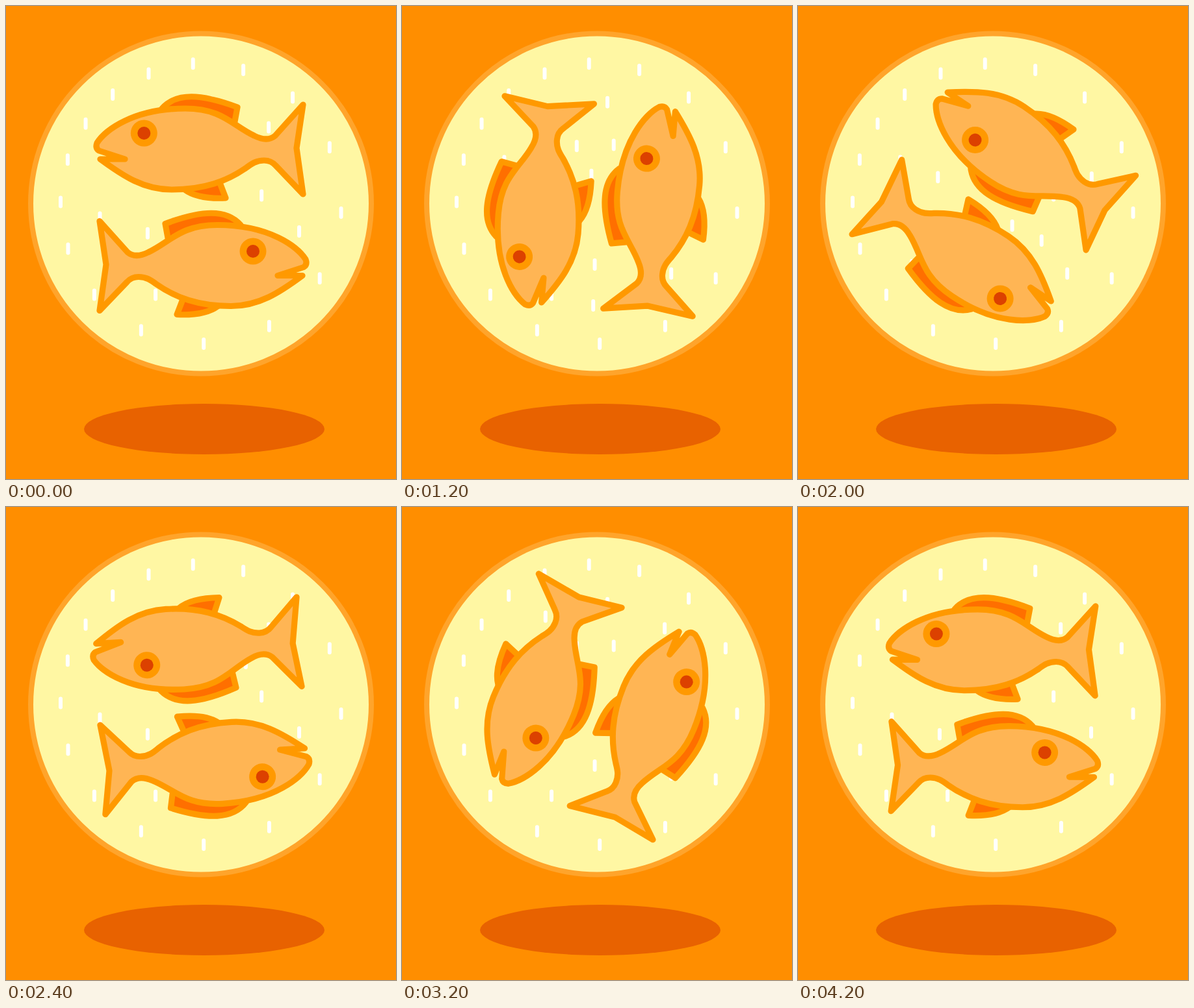
An HTML page for the animation above (4400 ms loop, 600 by 729 pixels).

```html
<!DOCTYPE html>
<html lang="en">
<head>
<meta charset="utf-8">
<title>Fish bowl</title>
<style>
  html, body { margin: 0; width: 100%; height: 100%; overflow: hidden; background: #ff8e00; }
  svg { display: block; }
</style>
</head>
<body>
<svg width="600" height="729" viewBox="0 0 600 729">
  <defs>
    <g id="fish" stroke="#ff9900" stroke-width="9.2" stroke-linejoin="round" stroke-linecap="round">
      <g fill="#ff6f00">
        <path d="M240 158C262 133 300 135 356 156L352 178"/>
        <path d="M275 283Q295 298 338 296L328 270"/>
      </g>
      <path fill="#ffb554" d="M457 152L447 219L457 290L415 246Q408 238 397 238C385 238 378 243 370 249
        C340 270 305 283 255 283C212 283 180 262 145 236L183 236L143 223Q137 219 140 211
        C152 192 195 158 276 158C333 158 348 184 382 200Q402 210 414 200Z"/>
    </g>
    <g id="eye">
      <circle r="20.5" fill="#ff9900"/>
      <circle r="10" fill="#dc4100"/>
    </g>
  </defs>
  <ellipse cx="305" cy="652" rx="185" ry="39" fill="#e86200"/>
  <circle cx="300" cy="304.5" r="262" fill="#fff7a3" stroke="#ffa42b" stroke-width="8"/>
  <path id="flecks" stroke="#fff" stroke-width="6" stroke-linecap="round"/>
  <g id="pair">
    <use href="#fish"/>
    <use href="#eye" x="212.3" y="196"/>
    <use href="#fish" transform="translate(601 179.5) scale(-1 1)"/>
    <use href="#eye" x="380" y="378"/>
  </g>
</svg>
<script>
  const radians = degrees => degrees * Math.PI / 180;

  // A ring of flecks, bunched together on one side by the sway.
  function ring(count, radius, start, sway, peak) {
    const gap = 360 / count;
    let path = '';
    for (let i = 0; i < count; i++) {
      const angle = radians(start - i * gap + sway * Math.cos(radians(gap * (i - peak))));
      const x = 300 + radius * Math.cos(angle);
      const y = 304.5 - radius * Math.sin(angle);
      path += `M${x} ${y - 6.5}v13`;
    }
    return path;
  }

  document.getElementById('flecks').setAttribute('d',
    ring(16, 216, 79, 16, 1.2) + ring(12, 157, 86, 12, 8.7) +
    ring(8, 94, 81, 18, 2.5) + ring(2, 45, 116, 15, 1));

  // Key poses of one counter-clockwise turn: [step, degrees].
  const STEP = 200, STEPS = 22;
  const poses = [[0, 0], [2, 14.7], [8, 120.2], [10, 146.3], [12, 183.3], [16, 247.8], [18, 288.4], [21, 359.7]];

  function turn(step) {
    const next = Math.max(1, poses.findIndex(([at]) => at >= step));
    const [from, a] = poses[next - 1];
    const [to, b] = poses[next];
    return a + (b - a) * (step - from) / (to - from);
  }

  const pair = document.getElementById('pair');

  function draw() {
    const step = Math.floor(performance.now() / STEP) % STEPS;
    pair.setAttribute('transform', `rotate(${-turn(step)} 300.3 308.5)`);
    requestAnimationFrame(draw);
  }
  draw();
</script>
</body>
</html>
```
